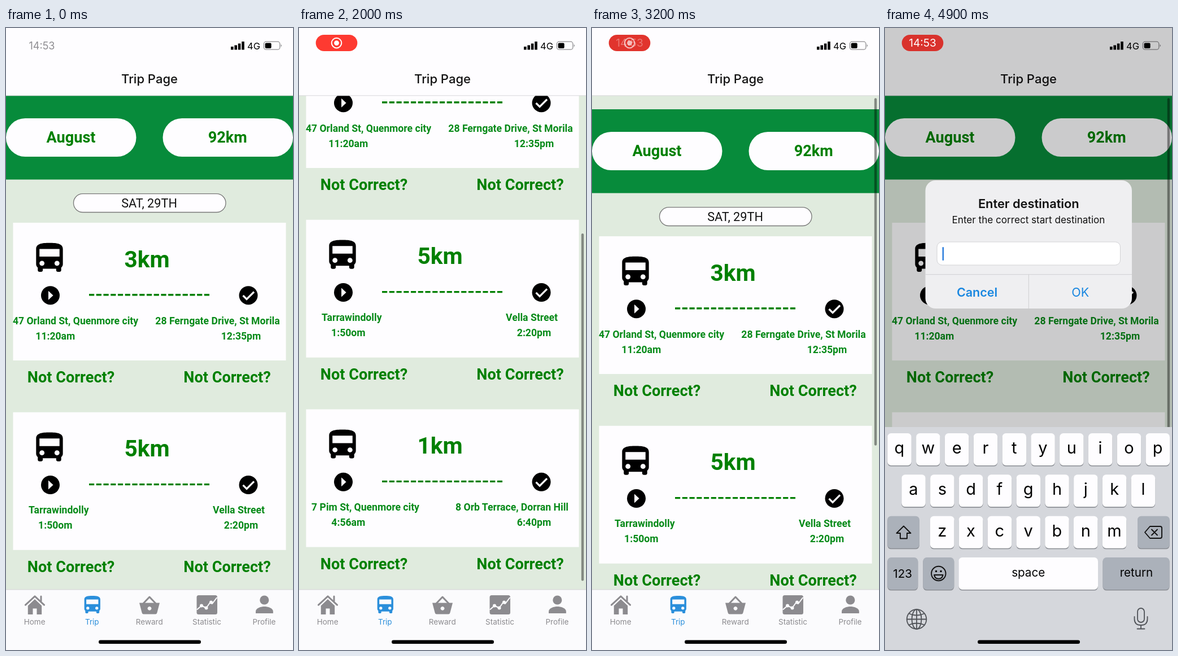
These frames come from a looping animation (508 by 1102 pixels, 5 s). An HTML page:

```html
<!DOCTYPE html>
<html lang="en">
<head>
<meta charset="utf-8">
<title>Trip Page</title>
<style>
  html, body { margin: 0; width: 100%; height: 100%; overflow: hidden; background: #fefdff; }
  svg { display: block; width: 100%; height: 100%; }
  text { font-family: Inter, Roboto, sans-serif; text-anchor: middle; }
  .trip text { font-family: Roboto, sans-serif; font-weight: 700; font-size: 27.1px; fill: #008000; }
  .trip .km { font-size: 40.6px; }
  .trip .place { font-size: 17.6px; fill: #068a18; }
  .trip .day { font-size: 21.7px; font-weight: 400; fill: #111; }
  .tabs { fill: #8c8b8f; }
  .tabs text { font-size: 13.5px; }
  .tabs .active { fill: #2b8fdb; }
  .line { fill: none; stroke-linecap: round; stroke-linejoin: round; }
  .key { font-size: 29px; }
  .word { font-size: 20.6px; }
</style>
</head>
<body>
<svg viewBox="0 0 508 1102" preserveAspectRatio="none">
  <defs>
    <path id="bus" fill-rule="evenodd" d="M0 14c0 .88.39 1.67 1 2.22V18c0 .55.45 1 1 1h1c.55 0 1-.45 1-1v-1h8v1c0 .55.45 1 1 1h1c.55 0 1-.45 1-1v-1.78c.61-.55 1-1.34 1-2.22V4c0-3.5-3.58-4-8-4S0 .5 0 4zM3.5 15a1.5 1.6 0 1 1 0-3.2a1.5 1.6 0 1 1 0 3.2zm9 0a1.5 1.6 0 1 1 0-3.2a1.5 1.6 0 1 1 0 3.2zM14 9H2V4h12z"/>
  </defs>

  <rect width="508" height="1102" fill="#e0ebde"/>
  <g id="content" class="trip">
    <rect y="120" width="508" height="148.5" fill="#078b3b"/>
    <g fill="#fefdff">
      <rect y="160" width="230.5" height="68" rx="34"/>
      <rect x="277.5" y="160" width="230.5" height="68" rx="34"/>
      <rect x="119.5" y="293.7" width="269.5" height="32.8" rx="16.4" stroke="#777" stroke-width="1.3"/>
    </g>
    <text x="115" y="203.3">August</text>
    <text x="392.3" y="203.3">92km</text>
    <text x="253.5" y="318.2" class="day">SAT, 29TH</text>
    <g id="cards"></g>
  </g>
  <rect id="scrollbar" x="499.7" width="4.4" height="615.5" rx="2.2" fill="#000" fill-opacity=".42"/>

  <rect width="508" height="120" fill="#fefdff"/>
  <path d="M0 119.8H508" stroke="#d8d7da"/>
  <text x="254" y="97.6" font-size="22" font-weight="500" fill="#111">Trip Page</text>
  <text id="clock" x="63.5" y="38" font-size="18" fill="#8e8d91">14:53</text>
  <path d="M398 38.5v-5.5h4.6v5.5zm6.4 0v-8h4.6v8zm6.4 0v-11h4.6v11zm6.4 0v-14.5h4.6v14.5z"/>
  <text x="438.6" y="38" font-size="16.5">4G</text>
  <rect x="456.4" y="24.2" width="28.4" height="14" rx="4" fill="none" stroke="#8d8c8f" stroke-width="1.3"/>
  <rect x="458.6" y="26.4" width="11" height="9.6" rx="2"/>
  <path d="M486.6 29q3 2.2 0 4.4z" fill="#8d8c8f"/>

  <g class="tabs">
    <rect y="995" width="508" height="107" fill="#fbfbfd"/>
    <path d="M0 995H508" stroke="#d3d3d5"/>
    <path d="M38.8 1023.5L51 1012l12.2 11.5V1039H54.5v-10.5h-7V1039h-8.7z"/>
    <path d="M34.5 1022.2L51 1006.8l16.5 15.4M62 1016v-9" class="line" stroke="#8c8b8f" stroke-width="3"/>
    <use href="#bus" transform="translate(138.6 1006) scale(1.77 1.63)" class="active"/>
    <path fill-rule="evenodd" d="M236 1018.5h36l-4.6 17.5q-.6 2.500-3 2.500H243.600q-2.400 0-3-2.500zM254 1025a3.400 3.400 0 1 0 .01 0z"/>
    <path d="M243.500 1019L254 1008l10.500 11" class="line" stroke="#8c8b8f" stroke-width="3"/>
    <rect x="337.500" y="1005" width="36.500" height="34" rx="3.500"/>
    <path d="M338.500 1030L346 1023.500L354.500 1027.500L361.500 1017.500L365 1020L373 1009.500" class="line" stroke="#fbfbfd" stroke-width="2"/>
    <g fill="#fbfbfd"><circle cx="346" cy="1023.500" r="3"/><circle cx="354.500" cy="1027.500" r="3"/><circle cx="363" cy="1017.500" r="3"/></g>
    <circle cx="457.300" cy="1013.500" r="8"/>
    <path d="M442 1037v-3.500c0-6 10-8.500 15.400-8.500s15.400 2.500 15.400 8.500v3.500z"/>
    <text x="50.600" y="1057">Home</text>
    <text x="152.300" y="1057" class="active">Trip</text>
    <text x="253.800" y="1057">Reward</text>
    <text x="355.500" y="1057">Statistic</text>
    <text x="457" y="1057">Profile</text>
  </g>

  <rect id="dim" width="508" height="1102"/>
  <g id="alert">
    <rect x="71.500" y="270" width="365.500" height="227" rx="18" fill="#efeff1"/>
    <text x="254.300" y="318.500" font-size="21.800" font-weight="600" fill="#111">Enter destination</text>
    <text x="254" y="346" font-size="17.100" fill="#111">Enter the correct start destination</text>
    <rect x="92" y="379" width="324.500" height="41" rx="9" fill="#fff" stroke="#d2d2d5"/>
    <rect x="101.500" y="388" width="2.600" height="24" rx="1.300" fill="#2f80dd"/>
    <path d="M71.500 436.700H437M254.300 436.700V497" stroke="#cfcfd2"/>
    <g font-size="21.500" fill="#1987e0">
      <text x="163" y="475.500" font-weight="600">Cancel</text>
      <text x="345.700" y="475.500">OK</text>
    </g>
  </g>

  <g id="keyboard">
    <rect y="707" width="508" height="395" fill="#d5d7dc"/>
    <g id="keys"></g>
    <g class="line" stroke="#111" stroke-width="1.900">
      <path d="M33 882.500l12.500 12.500h-6.500v9.500h-12v-9.500h-6.500z"/>
      <path d="M469 883h18q3 0 3 3v15q0 3-3 3h-18l-9-10.500zM472 888.500l10 10m0-10l-10 10"/>
      <circle cx="94.800" cy="966.500" r="12.700"/>
      <path d="M87 969h15.600q-1.500 7-7.800 7t-7.800-7z"/>
    </g>
    <circle cx="90.500" cy="962.500" r="1.700"/>
    <circle cx="99" cy="962.500" r="1.700"/>
    <g class="line" stroke="#505358" stroke-width="1.800">
      <circle cx="56" cy="1047.500" r="17.300"/>
      <ellipse cx="56" cy="1047.500" rx="8.500" ry="17.300"/>
      <path d="M56 1030.200v34.600M38.700 1047.500h34.600M42.500 1037.500q13.500 6 27 0M42.500 1057.500q13.500-6 27 0"/>
      <rect x="447" y="1028" width="12" height="25" rx="6"/>
      <path d="M441.500 1043v4q0 11 11.500 11t11.500-11v-4M453 1058v6.500M446.500 1064.500h13"/>
    </g>
  </g>

  <g id="pill">
    <rect id="pillShape" x="29.700" y="12" width="73.600" height="29" rx="14.500"/>
    <g id="recordIcon" fill="#fff">
      <circle cx="66.500" cy="26.600" r="8.800" fill="none" stroke="#fff" stroke-width="2"/>
      <circle cx="66.500" cy="26.600" r="4.400"/>
    </g>
    <text id="pillClock" x="66.500" y="33.200" font-size="19" fill="#fff">14:53</text>
  </g>
  <rect x="164" y="1084.500" width="181" height="6.500" rx="3.250"/>
</svg>

<script>
  const LOOP = 5000, STEP = 100;
  const el = id => document.getElementById(id);
  const label = (x, y, text, cls = '') => `<text x="${x}" y="${y}" class="${cls}">${text}</text>`;

  // Each place: name, centre x, time, time's centre x.
  const trips = [
    { km: '3km', from: ['47 Orland St, Quenmore city', 123, '11:20am', 87.3], to: ['28 Ferngate Drive, St Morila', 374.5, '12:35pm', 416] },
    { km: '5km', from: ['Tarrawindolly', 93.3, '1:50om', 87.3], to: ['Vella Street', 412, '2:20pm', 416] },
    { km: '1km', from: ['7 Pim St, Quenmore city', 117.5, '4:56am', 87.3], to: ['8 Orb Terrace, Dorran Hill', 377, '6:40pm', 416] }
  ];
  const place = ([name, x, time, timeX]) => label(x, 524.7, name, 'place') + label(timeX, 551.7, time, 'place');
  const card = ({ km, from, to }, i) => `<g transform="translate(0 ${i * 335.8})">
    <rect x="12.500" y="345" width="483" height="244" fill="#fefdff"/>
    <use href="#bus" transform="translate(53.300 380.800) scale(2.960 2.690)"/>
    ${label(249.5, 423.6, km, 'km')}
    <circle cx="78.500" cy="473.700" r="16.500"/>
    <path d="M75 465.700v16l8.500-8z" fill="#fefdff"/>
    <path d="M147 472.800H360" stroke="#008000" stroke-width="3.400" stroke-dasharray="9.200 3.540"/>
    <circle cx="429" cy="473.700" r="16.500"/>
    <path d="M419.500 474l6.500 6.500l13-13" fill="none" stroke="#fefdff" stroke-width="3.300"/>
    ${place(from)}${place(to)}
    ${label(115, 628.2, 'Not Correct?')}${label(391.5, 628.2, 'Not Correct?')}</g>`;
  el('cards').innerHTML = trips.map(card).join('');

  const key = (x, y, width, fill = '#fefdff') =>
    `<rect x="${x}" y="${y + 1.6}" width="${width}" height="57" rx="6.500" fill="#8b8e94"/>
     <rect x="${x}" y="${y}" width="${width}" height="57" rx="6.500" fill="${fill}"/>`;
  const row = (letters, left, y) => [...letters].map((letter, i) => {
    const x = left + i * 50.8;
    return key(x, y, 42.5) + label(x + 21.2, y + 36, letter, 'key');
  }).join('');
  const grey = '#abb1ba';
  el('keys').innerHTML =
    row('qwertyuiop', 4.3, 718) + row('asdfghjkl', 29.3, 791.3) + row('zxcvbnm', 80, 864.7) +
    key(4.3, 864.7, 56.5, grey) + key(447, 864.7, 56.7, grey) +
    key(4.3, 938, 54, grey) + key(67.3, 938, 55, grey) + key(130.3, 938, 246.7) + key(385.5, 938, 118, grey) +
    label(31.2, 974, '123', 'word') + label(253.7, 972, 'space', 'word') + label(445, 972, 'return', 'word');

  const scrollKeys = [
    [1400, 0], [1500, 60], [1600, 165], [1700, 244], [1800, 295], [1900, 325], [2000, 341], [2200, 354],
    [2400, 357], [2600, 357], [2700, 325], [2800, 235], [2900, 108], [3000, 22], [3100, -24],
    [3200, -24], [3400, -7], [3600, -1], [3700, 0]
  ];
  const progress = (t, from, to) => Math.min(1, Math.max(0, (t - from) / (to - from)));
  const easeOut = p => 1 - (1 - p) ** 3;
  const mix = (a, b, p) => a + (b - a) * p;

  function scrollAt(t) {
    const next = scrollKeys.findIndex(([time]) => t < time);
    if (next <= 0) return 0;
    const [t0, y0] = scrollKeys[next - 1], [t1, y1] = scrollKeys[next];
    return mix(y0, y1, progress(t, t0, t1));
  }

  function draw(t) {
    const scroll = scrollAt(t);
    el('content').setAttribute('transform', `translate(0 ${-scroll})`);
    el('scrollbar').setAttribute('y', 124.3 + 0.703 * Math.max(0, scroll));
    el('scrollbar').setAttribute('opacity', t > 1400 ? 1 : 0);

    el('clock').setAttribute('opacity', 1 - progress(t, 0, 200));
    el('pill').setAttribute('opacity', progress(t, 200, 500));
    const glow = (1 + Math.cos((t - 1900) / 1000 * Math.PI)) / 2;
    el('pillShape').setAttribute('fill', `rgb(${mix(217, 255, glow)},${mix(50, 58, glow)},${mix(44, 49, glow)})`);
    const timeShown = progress(t, 3100, 3400);
    el('recordIcon').setAttribute('opacity', 1 - timeShown);
    el('pillClock').setAttribute('opacity', timeShown);

    const shown = easeOut(progress(t, 4300, 4800));
    const scale = mix(1.15, 1, shown);
    el('dim').setAttribute('opacity', 0.2 * shown);
    el('alert').setAttribute('opacity', shown);
    el('alert').setAttribute('transform', `translate(254.3 383.5) scale(${scale}) translate(-254.3 -383.5)`);
    el('keyboard').setAttribute('transform', `translate(0 ${mix(395, 0, shown)})`);
    el('keyboard').setAttribute('visibility', shown ? 'visible' : 'hidden');
  }

  const start = performance.now();
  function tick() {
    const elapsed = performance.now() - start;
    draw(Math.floor(elapsed / STEP) * STEP % LOOP);
    requestAnimationFrame(tick);
  }
  tick();
</script>
</body>
</html>
```
